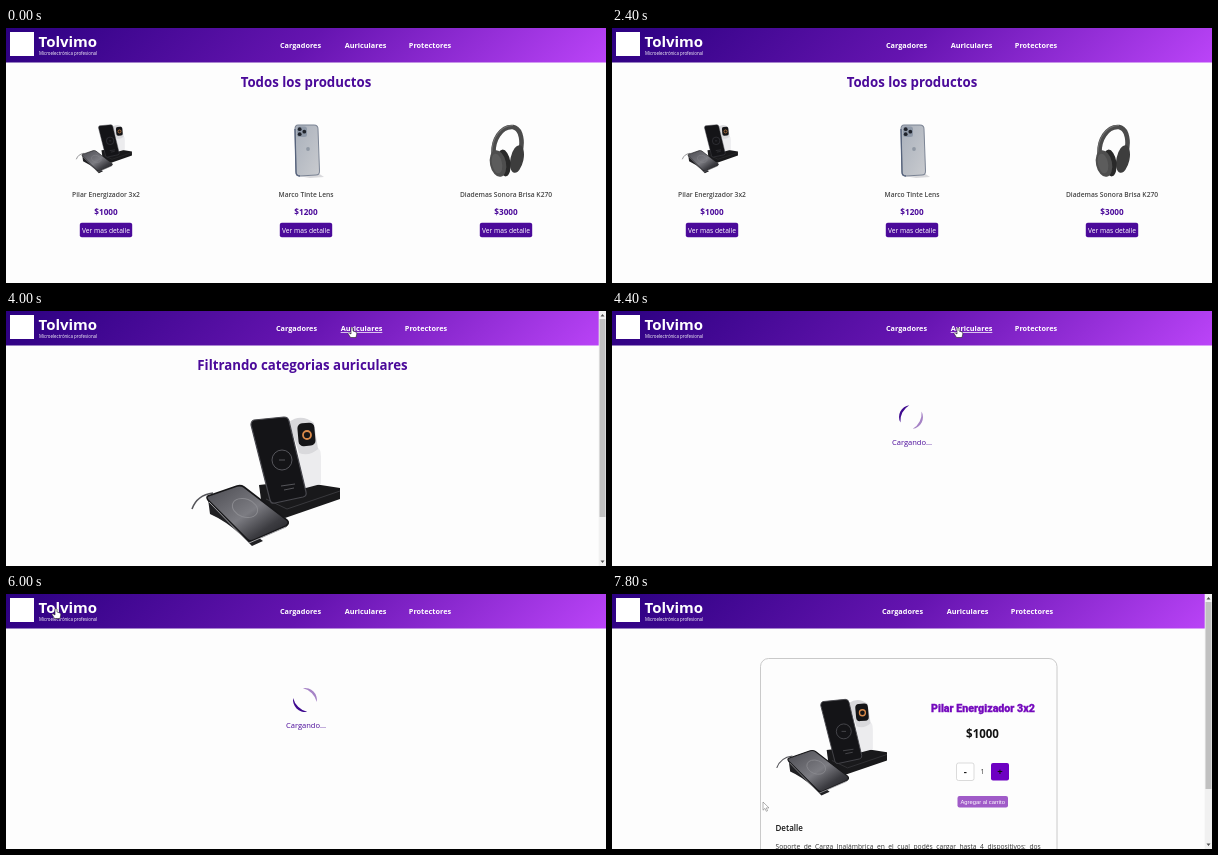
Recreate the animation shown at these times as an HTML page. Size 600x255 px, loop 8000 ms.

```html
<!DOCTYPE html>
<html lang="es">
<head>
<meta charset="utf-8">
<title>Tienda</title>
<style>
  html, body { margin: 0; width: 100%; height: 100%; overflow: hidden; background: #fdfdfd; }
  svg { display: block; width: 100vw; height: 100vh; font-family: "Open Sans", "Noto Sans", sans-serif; }
  .bold { font-weight: 700; }
  .semi { font-weight: 600; }
  .impact { font-family: Roboto, sans-serif; font-weight: 900; }
  .arial { font-family: "Liberation Sans", sans-serif; }
</style>
</head>
<body>
<svg viewBox="0 0 600 255">
  <defs>
    <linearGradient id="bar" gradientUnits="userSpaceOnUse" x1="141" y1="-141" x2="459" y2="176">
      <stop offset="0" stop-color="#2b0080"/>
      <stop offset=".5" stop-color="#6514b0"/>
      <stop offset="1" stop-color="#bb44f8"/>
    </linearGradient>
    <linearGradient id="glass" x1="0" y1="0" x2="1" y2="1">
      <stop offset="0" stop-color="#4a4a50"/>
      <stop offset=".5" stop-color="#7c7c82"/>
      <stop offset=".75" stop-color="#3c3c41"/>
      <stop offset="1" stop-color="#1c1c20"/>
    </linearGradient>
    <linearGradient id="steel" x1="0" y1="0" x2="1" y2="1">
      <stop offset="0" stop-color="#a9b0bb"/>
      <stop offset="1" stop-color="#c9cbcf"/>
    </linearGradient>

    <g id="charger">
      <path d="M-79 22Q-74 8 -58 6" fill="none" stroke="#55555a" stroke-width="1.6"/>
      <path d="M-12 -2L24 -6L69 1V12L14 31L-9 20Z" fill="#19191b"/>
      <path d="M-5 12L16 22L69 4" fill="none" stroke="#39393d"/>
      <path d="M27 -38L46 -40Q50 -38 50 -30V-3L31 2Z" fill="#ececee"/>
      <path d="M18 -65Q30 -74 43 -64L47 -38Q38 -30 28 -34Z" fill="#d9d9dc"/>
      <rect x="27" y="-64" width="17" height="23" rx="5" fill="#151517" transform="rotate(-5 35 -52)"/>
      <circle cx="36" cy="-52" r="4" fill="none" stroke="#d98a4a" stroke-width="1.8"/>
      <path d="M-17 -67L13 -70Q17 -70 18 -66L35 5Q36 9 32 10L4 16Q0 17 -1 13L-20 -62Q-20 -66 -17 -67Z"
            fill="#141417" stroke="#48484e" stroke-width="1.2"/>
      <circle cx="11" cy="-27" r="10" fill="none" stroke="#55555b"/>
      <path d="M8 -27H14M10 -1L24 -3M13 3L23 1" stroke="#66666b" stroke-width=".8"/>
      <path d="M-63 12L-61 27Q-45 34 -30 48L-19 59L-8 54Z" fill="#202023"/>
      <path d="M-63 9L-34 -1Q-30 -2 -27 0L16 33Q19 36 15 39L-17 53Q-21 55 -24 52L-63 13Q-65 10 -63 9Z"
            fill="url(#glass)" stroke="#161618" stroke-width="1.6"/>
      <path d="M-62 15L-22 56L15 40" fill="none" stroke="#a2a2a6" stroke-width="1"/>
      <ellipse cx="-26" cy="21" rx="13" ry="9" fill="none" stroke="#8b8b90" transform="rotate(20 -26 21)"/>
    </g>

    <g id="cover" transform="scale(2.66)">
      <path d="M-8 25L12 22L18 26L4 27Z" fill="#d9d9dc"/>
      <path d="M-8 -26L8 -26Q12 -26 12 -22L13.5 20Q13.5 24 10 24L-6 25Q-10 25 -10 21L-11 -22Q-11 -26 -8 -26Z"
            fill="url(#steel)" stroke="#7b8494" stroke-width="1"/>
      <path d="M-11 -22L-10 21Q-10 25 -6 25" fill="none" stroke="#56637c" stroke-width="1.3"/>
      <rect x="-9" y="-24.5" width="10" height="10.5" rx="2.5" fill="#8f99a8"/>
      <g fill="#20242c"><circle cx="-6.3" cy="-21.8" r="1.9"/><circle cx="-6.3" cy="-16.8" r="1.9"/><circle cx="-1.7" cy="-19.3" r="1.9"/></g>
      <circle cx="2" cy="-2" r="1.9" fill="#8f97a3"/>
    </g>

    <g id="headset" transform="scale(2.66)">
      <path d="M-12 8C-15 -12 -4 -25 7 -24C16 -22 17 -8 14 2" fill="none" stroke="#4b4b4b" stroke-width="4.6"/>
      <path d="M-14 4C-15 -14 -4 -26 7 -25.5" fill="none" stroke="#717171" stroke-width="1"/>
      <ellipse cx="11" cy="8" rx="6.5" ry="14" fill="#3d3d3d" transform="rotate(12 11 8)"/>
      <ellipse cx="-2" cy="12" rx="6.5" ry="13.5" fill="#292929" transform="rotate(-8 -2 12)"/>
      <ellipse cx="-8" cy="12.5" rx="8" ry="13.5" fill="#4e4e4e" transform="rotate(-12 -8 12.5)"/>
      <ellipse cx="-9" cy="12.5" rx="5" ry="10" fill="#5c5c5c" transform="rotate(-12 -9 12.5)"/>
    </g>

    <path id="arrow" d="M0 0V8.2L2 6.4L3.3 9.3L4.6 8.7L3.3 5.9H6Z" fill="#fff" stroke="#666" stroke-width=".5"/>
    <path id="hand" d="M-1 -4Q0 -5 1 -4V-1L4 0Q5 .5 4.8 2L4 5.5H-1.5L-4 1.5Q-3.5 .3 -2.3 1.2L-1 2Z"
          fill="#fff" stroke="#222" stroke-width=".6"/>
  </defs>
  <g id="stage"></g>
</svg>
<script>
const LOOP = 8000;
const PURPLE = '#4b0a9a';
const stage = document.getElementById('stage');

const products = [
  { art: 'charger', name: 'Pilar Energizador 3x2', price: '$1000' },
  { art: 'cover', name: 'Marco Tinte Lens', price: '$1200' },
  { art: 'headset', name: 'Diademas Sonora Brisa K270', price: '$3000' },
];
const links = [['Cargadores', 294.5], ['Auriculares', 359.5], ['Protectores', 424]];

const text = (x, y, str, size, fill, cls = '', extra = '') =>
  `<text x="${x}" y="${y}" font-size="${size}" fill="${fill}" class="${cls}" ${extra}>${str}</text>`;
const centered = (x, y, str, size, fill, cls, extra = '') =>
  text(x, y, str, size, fill, cls, 'text-anchor="middle" ' + extra);
const box = (x, y, w, h, fill, extra = '') =>
  `<rect x="${x}" y="${y}" width="${w}" height="${h}" fill="${fill}" ${extra}/>`;
const use = (id, x, y, scale = 1) =>
  `<use href="#${id}" transform="translate(${x} ${y}) scale(${scale})"/>`;
const heading = (x, str) => centered(x, 59, str, 13.25, PURPLE, 'bold');

function header(hover, shift) {
  const nav = links.map(([label, x], i) => centered(x - shift, 20, label, 7.3, '#fff', 'bold',
    i === hover ? 'text-decoration="underline"' : ''));
  return box(0, 0, 600, 34.5, 'url(#bar)') + box(4, 4, 24, 24, '#fff') +
    text(32.5, 19, 'Tolvimo', 15, '#fff', 'bold') +
    text(33, 26.5, 'Microelectrónica profesional', 4.4, '#fff') + nav.join('');
}

function scrollbar(end) {
  return box(592.7, 0, 7.3, 255, '#f1f1f1') + box(593.5, 8, 6, end - 8, '#c1c1c1') +
    '<path d="M594.5 5.5L596.5 3L598.5 5.5ZM594.5 249.5L596.5 252L598.5 249.5Z" fill="#505050"/>';
}

const scenes = {
  grid: () => heading(300, 'Todos los productos') + products.map((p, i) => {
    const x = 100 + 200 * i;
    return use(p.art, x, 123, .376) +
      centered(x, 169, p.name, 6.7, '#444', 'semi') +
      centered(x, 187, p.price, 8.2, PURPLE, 'bold') +
      box(x - 26.2, 194.8, 52.4, 14.4, PURPLE, 'rx="2"') +
      centered(x, 204.7, 'Ver mas detalle', 6.7, '#fff');
  }).join(''),

  loading: angle =>
    `<g transform="translate(299 106) rotate(${angle})">
      <path d="M-6.9 -9.8A12 12 0 0 0 -6.9 9.8A18.5 18.5 0 0 1 -6.9 -9.8Z" fill="#3f0a8f"/>
      <path d="M6.9 -9.8A12 12 0 0 1 6.9 9.8A18.5 18.5 0 0 0 6.9 -9.8Z" fill="#a683c6"/>
    </g>` + centered(300, 134, 'Cargando...', 7.55, PURPLE),

  category: (art, label) => heading(296.5, 'Filtrando categorias ' + label) +
    use(art, 265, 176) + scrollbar(206),

  detail: () => {
    const { art, name, price } = products[0];
    return box(148.5, 64.5, 296.5, 260, '#fdfdfd', 'rx="8" stroke="#bdbdbd" stroke-width=".8"') +
      use(art, 223.6, 157.5, .745) +
      centered(371, 117.5, name, 10.7, '#7409bd', 'impact', 'stroke="#7409bd" stroke-width=".3"') +
      centered(370.5, 143.5, price, 11.5, '#111', 'bold') +
      box(344.5, 169, 17.5, 17.5, '#fff', 'rx="2" stroke="#ccc" stroke-width=".7"') +
      centered(353.3, 181, '-', 9.5, '#111', 'bold') +
      centered(370.5, 180, '1', 6.8, '#333') +
      box(379, 169, 18, 17.5, '#6d00c2', 'rx="2"') +
      centered(388, 181, '+', 9.5, '#111', 'bold') +
      box(345.5, 202, 50.5, 11.5, '#a05bc8', 'rx="2"') +
      centered(370.7, 209.8, 'Agregar al carrito', 5.8, '#fff', 'arial') +
      text(163.5, 236.5, 'Detalle', 8, '#111', 'semi') +
      text(163.5, 254.7, 'Soporte de Carga Inalámbrica en el cual podés cargar hasta 4 dispositivos; dos',
        6.7, '#333', '', 'word-spacing="1.8"') +
      scrollbar(195);
  },
};

// [start, scene, scene arguments, hovered link, pointer, x, y]
const steps = [
  [0, 'grid', []],
  [3200, 'loading', [-45], 0, 'hand', 306, 23],
  [3400, 'loading', [27], 0, 'hand', 306, 23],
  [3600, 'category', ['charger', 'cargadores'], 0, 'hand', 306, 23],
  [3800, 'category', ['charger', 'cargadores'], 1, 'hand', 340, 21],
  [4000, 'category', ['charger', 'auriculares'], 1, 'hand', 346, 21],
  [4200, 'loading', [-45], 1, 'hand', 346, 21],
  [4400, 'loading', [27], 1, 'hand', 346, 21],
  [4600, 'category', ['headset', 'auriculares'], 1, 'hand', 347, 21],
  [4800, 'category', ['headset', 'protectores'], 2, 'hand', 405, 21],
  [5000, 'loading', [-15], 2, 'hand', 405, 21],
  [5200, 'loading', [57], 2, 'hand', 405, 21],
  [5400, 'category', ['cover', 'protectores'], 2, 'hand', 405, 21],
  [5600, 'category', ['cover', 'protectores'], -1, 'arrow', 250, 20],
  [5800, 'category', ['cover', 'protectores'], -1, 'hand', 50, 19],
  [6000, 'loading', [-45], -1, 'hand', 50, 19],
  [6200, 'loading', [27], -1, 'hand', 50, 19],
  [6400, 'grid', [], -1, 'hand', 50, 19],
  [6600, 'grid', [], -1, 'arrow', 95, 130],
  [6800, 'grid', [], -1, 'arrow', 126.5, 212],
  [7000, 'grid', [], -1, 'hand', 112, 204],
  [7200, 'loading', [-45], -1, 'arrow', 112, 202],
  [7400, 'loading', [27], -1, 'arrow', 112, 202],
  [7600, 'detail', [], -1, 'arrow', 125, 204],
  [7800, 'detail', [], -1, 'arrow', 151, 208],
];

let shown;
function draw() {
  const time = performance.now() % LOOP;
  const step = steps.findLast(([start]) => start <= time);
  if (step !== shown) {
    shown = step;
    const [, scene, args, hover, pointer, x, y] = step;
    const shift = scene === 'category' || scene === 'detail' ? 4 : 0;
    stage.innerHTML = header(hover, shift) + scenes[scene](...args) +
      (pointer ? use(pointer, x, y) : '');
  }
  requestAnimationFrame(draw);
}
draw();
</script>
</body>
</html>
```
